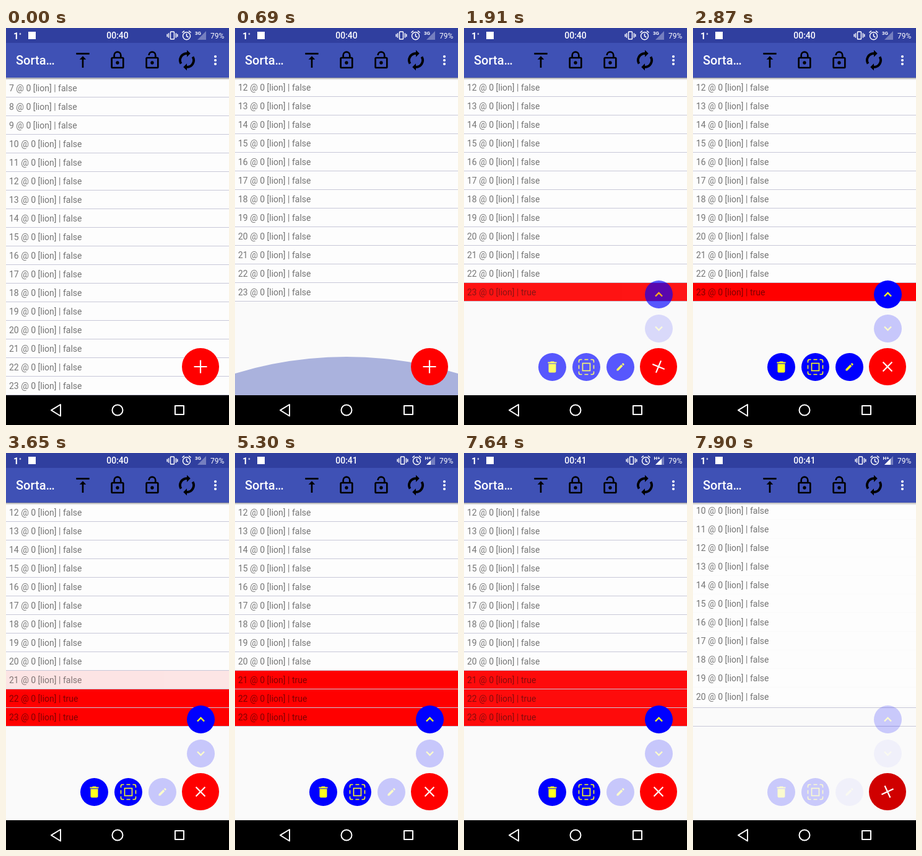
These frames come from a looping animation (360 by 640 pixels, 7.99 s). An HTML page:

```html
<!DOCTYPE html>
<html lang="en">
<head>
<meta charset="utf-8">
<title>List selection</title>
<style>
html, body { margin: 0; width: 100%; height: 100%; overflow: hidden; background: #000; }
svg { display: block; width: 100vw; height: 100vh; }
text { font-family: Roboto, sans-serif; white-space: pre; }
.line { fill: none; stroke-width: 2; }
</style>
</head>
<body>
<svg viewBox="0 0 360 640">
  <defs>
    <clipPath id="body"><rect y="80" width="360" height="512"/></clipPath>
    <clipPath id="bars"><rect id="level" x="300" width="0" height="24"/></clipPath>
    <linearGradient id="shade" x2="0" y2="1">
      <stop stop-opacity=".3"/><stop offset="1" stop-opacity="0"/>
    </linearGradient>
  </defs>

  <rect width="360" height="640" fill="#fafafa"/>
  <g clip-path="url(#body)">
    <g id="lines" fill="#c8c8d8"></g>
    <g id="rows" font-size="14"></g>
    <circle id="glow" cx="180" r="613.5" fill="#3f51b5"/>
  </g>

  <g id="menu"></g>
  <g id="fab">
    <circle id="disc" cx="314" cy="546" r="30"/>
    <path id="plus" d="M-10.5 0H10.5M0 -10.5V10.5" stroke="#fff" stroke-width="2.2"/>
  </g>

  <rect y="80" width="360" height="4" fill="url(#shade)"/>
  <rect width="360" height="80" fill="#3f51b5"/>
  <rect width="360" height="24" fill="#303f9f"/>

  <g fill="#fff">
    <text x="12" y="17.5" font-size="15" font-weight="700">1</text>
    <text x="21" y="16" font-size="10" font-weight="700">°</text>
    <rect x="36" y="6" width="12" height="12"/>
    <text id="clock" x="180" y="17" font-size="14" font-weight="500" text-anchor="middle"></text>
    <text x="330" y="16.5" font-size="12">79%</text>
    <path d="M309 19H323V5Z" fill="#757fbf"/>
    <path d="M309 19H323V5Z" clip-path="url(#bars)"/>
    <text id="net" y="11" font-size="8" font-weight="700"></text>
    <g id="alerts" class="line" stroke="#fff">
      <g transform="translate(259.5 3) scale(.75)">
        <rect x="8" y="4" width="8" height="16" rx="1"/>
        <path d="M1 9V15M4 7V17M20 7V17M23 9V15"/>
      </g>
      <g transform="translate(282.5 3) scale(.75)">
        <circle cx="12" cy="13" r="8"/>
        <path d="M12 8V13.5L16 16M2.5 6L7.2 2.2M21.5 6L16.8 2.2"/>
      </g>
    </g>
    <text x="16" y="59" font-size="20" font-weight="500">Sorta…</text>
    <circle cx="338" cy="46" r="2.1"/><circle cx="338" cy="52" r="2.1"/><circle cx="338" cy="58" r="2.1"/>
  </g>

  <g id="tools"></g>

  <rect y="592" width="360" height="48"/>
  <g class="line" stroke="#fff" stroke-linejoin="round">
    <path d="M73 616.2L88 607V625.5Z"/>
    <circle cx="180" cy="616" r="8.5"/>
    <rect x="273" y="609" width="14" height="14"/>
  </g>
</svg>
<script>
const LOOP = 7990, STEP = 86.85, PITCH = 30, LAST = 23, BOTTOM = 592;
const $ = id => document.getElementById(id);
const clamp = x => Math.max(0, Math.min(1, x));
const ramp = (t, start, length) => clamp((t - start) / length);
const ease = u => (1 - Math.cos(Math.PI * u)) / 2;

function add(parent, tag, attrs = {}, html = '') {
  const el = document.createElementNS('http://www.w3.org/2000/svg', tag);
  set(el, attrs);
  el.innerHTML = html;
  return parent.appendChild(el);
}
function set(el, attrs) {
  for (const key in attrs) el.setAttribute(key, attrs[key]);
}

// Toolbar icons on a 24 unit grid
const lockBody = '<rect x="5" y="9" width="14" height="12" rx="1"/><circle cx="12" cy="15" r="2" fill="#000" stroke="none"/>';
const turn = '<path d="M12.5 3.75H12A8.25 8.25 0 0 0 4.9 16.2" stroke-width="2.9"/><path d="M12 -.4l4.3 4.2-4.3 4.2z" fill="#000" stroke="none"/>';
[
  '<path d="M4 4H20M12 10V21"/><path d="M8 11h8l-4-4z" fill="#000" stroke="none"/>',
  lockBody + '<path d="M8 9V6a4 4 0 0 1 8 0V9"/>',
  lockBody + '<path d="M8 6a4 4 0 0 1 8 0V9"/>',
  turn + `<g transform="rotate(180 12 12)">${turn}</g>`
].forEach((icon, i) => add($('tools'), 'g', {
  class: 'line', stroke: '#000',
  transform: `translate(${108 + 56 * i} 36) scale(1.3333)`
}, icon));

// Round menu buttons, icons centred on 0,0
const YELLOW = '#ffff20', DIM = .2;
const chevron = `<path d="M-5.5 3L0 -2.5L5.5 3" fill="none" stroke="${YELLOW}" stroke-width="2.4"/>`;
const corner = '<path d="M-12 -7V-9.5Q-12 -12 -9.5 -12H-7M-3 -12H3"/>';
const button = (x, y, icon) => add($('menu'), 'g', { transform: `translate(${x} ${y})` },
  `<circle r="22.5" fill="#00f"/>${icon}`);
button(314.5, 429.5, chevron);
set(button(314.5, 484.5, `<g transform="scale(1 -1)">${chevron}</g>`), { opacity: DIM });
button(142.5, 546.5,
  `<path d="M-6 -5H6V7Q6 9 4 9H-4Q-6 9 -6 7ZM-7 -8H-3.5L-2.5 -9H2.5L3.5 -8H7V-6H-7Z" fill="${YELLOW}"/>`);
button(197.5, 546.5, `<g fill="none" stroke="${YELLOW}" stroke-width="1.6">` +
  '<rect x="-6" y="-6" width="12" height="12"/>' +
  [0, 90, 180, 270].map(a => `<g transform="rotate(${a})">${corner}</g>`).join('') + '</g>');
const edit = button(252.5, 546.5,
  `<path d="M-6 3.5V6H-3.5L3.9 -1.4L1.4 -3.9ZM2.3 -4.8L3.5 -6Q4.2 -6.4 4.8 -6L6 -4.8Q6.4 -4.2 6 -3.5L4.8 -2.3Z" fill="${YELLOW}"/>`);

// Rows that get picked, with the start of their cross-fade
const picks = { 23: 1706, 22: 2899, 21: 3599 };
const rows = [];

function face(parent, n, picked) {
  return add(parent, 'g', {},
    `<rect width="360" height="${PITCH - 1}" fill="${picked ? '#f00' : '#fdfdfd'}"/>` +
    `<text x="5" y="20" fill="${picked ? '#800000' : '#757575'}">${n} @ 0 [lion] | ${picked}</text>`);
}
for (let n = 0; n <= LAST; n++) {
  const g = add($('rows'), 'g');
  rows.push({ g, n, plain: face(g, n, false), red: picks[n] && face(g, n, true) });
  add($('lines'), 'rect', { y: n * PITCH + PITCH - 1, width: 360, height: 1 });
}

function drawRow(row, t, slide, gone) {
  set(row.g, { transform: `translate(0 ${row.n * PITCH + (row.red ? 0 : slide)})` });
  if (!row.red) return;
  const picked = ease(ramp(t, picks[row.n], 250));
  set(row.plain, { opacity: 1 - picked });
  set(row.red, { opacity: picked });
  set(row.g, { opacity: 1 - gone });
}

function draw(t) {
  // Fling to the end of the list, then the edge glow
  const top = -128 - 151 * Math.pow(ramp(t, 230, 370), 1.2);
  const move = `translate(0 ${Math.round(top)})`;
  set($('lines'), { transform: move });
  set($('rows'), { transform: move });
  const fade = Math.pow(1 - ramp(t, 695, 520), 2);
  const rise = 62 * Math.sqrt(ramp(t, 540, 150)) * fade;
  set($('glow'), { cy: BOTTOM - rise + 613.5, opacity: .43 * Math.sqrt(fade) });

  // Deleted rows fade, the rest slides down
  const gone = ramp(t, 7637, 120);
  const slide = 90 * ease(ramp(t, 7757, 250));
  rows.forEach(row => drawRow(row, t, Math.round(slide), gone));

  // Menu
  const shown = ramp(t, 1780, 200) - ramp(t, 7783, 150);
  set($('menu'), { opacity: shown, visibility: shown > 0 ? 'visible' : 'hidden' });
  set(edit, { opacity: t < 2940 ? 1 : DIM });
  const angle = 45 * (ramp(t, 1777, 267) + ramp(t, 7783, 270));
  set($('plus'), { transform: `translate(314 546) rotate(${angle})` });
  set($('disc'), { fill: t > 7810 ? '#d00000' : '#ff0000' });

  // Status bar
  const late = t >= 5290;
  $('clock').textContent = late ? '00:41' : '00:40';
  $('net').textContent = late ? 'H+' : '3G';
  set($('net'), { x: late ? 306.5 : 305 });
  set($('alerts'), { transform: `translate(${late ? 2 : 0} 0)` });
  set($('level'), { width: t >= 6505 ? 19 : t >= 4250 ? 16 : 0 });
}

function tick() {
  const t = performance.now() % LOOP;
  draw(Math.floor((t + 6) / STEP) * STEP % LOOP);
  requestAnimationFrame(tick);
}
tick();
</script>
</body>
</html>
```
